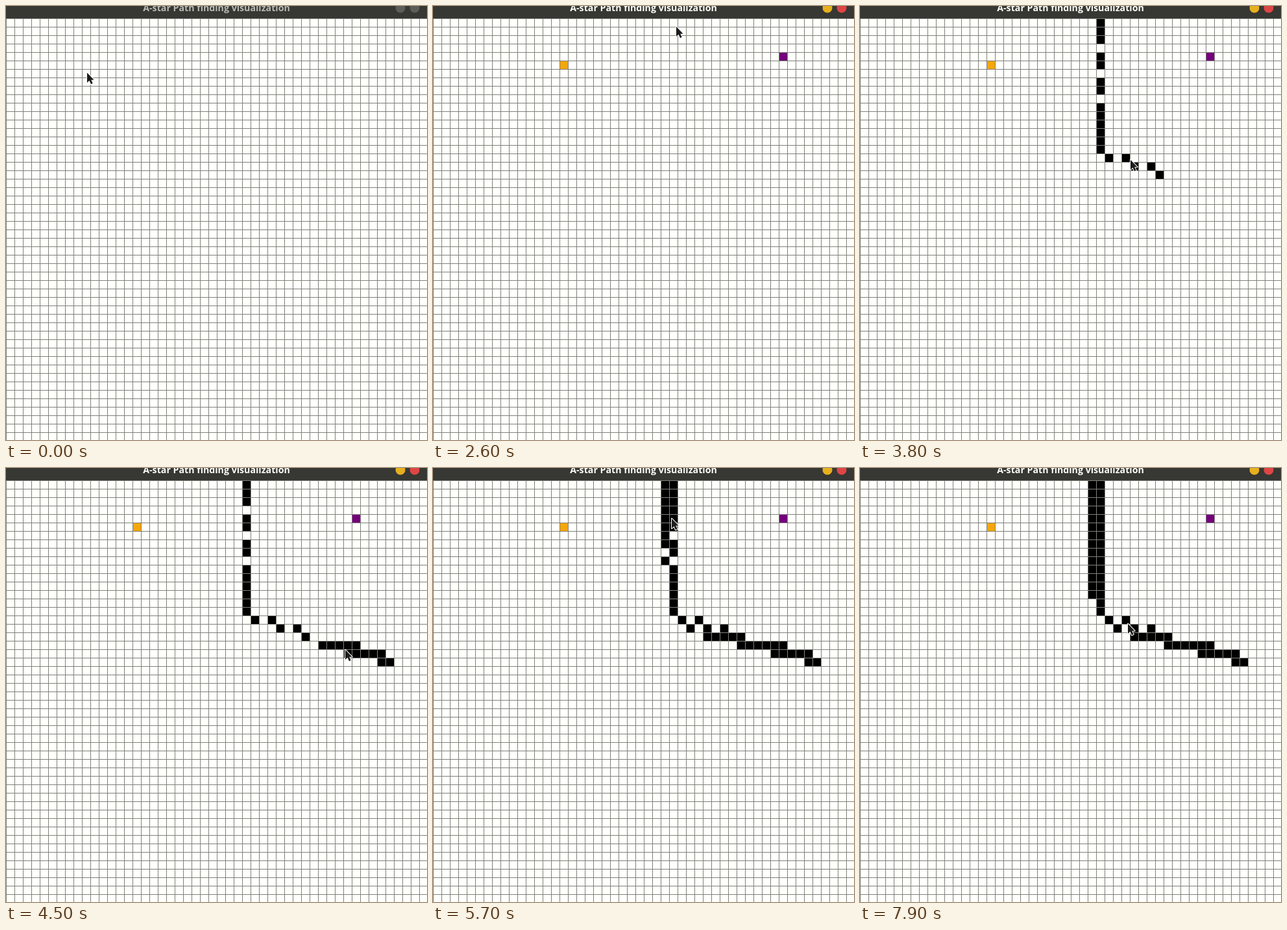
Recreate the animation shown at these times as an HTML page with a canvas. Size 649 by 668 pixels, loop 8000 ms.

```html
<!DOCTYPE html>
<html lang="en">
<head>
<meta charset="utf-8">
<title>A-star Path finding visualization</title>
<style>
html, body { margin: 0; width: 100%; height: 100%; overflow: hidden; }
canvas { display: block; }
</style>
</head>
<body>
<canvas id="stage" width="649" height="668"></canvas>
<script>
const W = 649, H = 668, CELL = 13, TOP = 19, LOOP = 8000, STEP = 100;
const ctx = document.getElementById('stage').getContext('2d');
const walls = [], moves = [];

// Paint cells evenly from time a to time b
function paint(a, b, cells) {
  const last = Math.max(1, cells.length - 1);
  cells.forEach(([col, row], i) => walls.push({ col, row, time: a + (b - a) * i / last }));
}
function range(a, b) {
  return Array.from({ length: Math.abs(b - a) + 1 }, (_, i) => a + i * Math.sign(b - a));
}
const column = (col, a, b) => range(a, b).map(row => [col, row]);
const line = (row, a, b) => range(a, b).map(col => [col, row]);
const gap = ([, row]) => row > 0 && row < 10 && row % 3 === 0;

// First pass: quick and full of holes
paint(2800, 3600, column(28, 0, 15).filter(c => !gap(c)));
paint(3700, 3800, range(0, 4).map(i => [Math.round(29 + 1.5 * i), 16 + (i >> 1)]));
paint(3900, 4000, line(19, 37, 41));
paint(4100, 4200, line(21, 44, 45));
// Way back: close the holes and thicken the wall
paint(4300, 4500, line(20, 44, 40));
paint(4600, 4800, [[36, 19], ...line(18, 36, 32), [30, 17]]);
paint(5100, 5500, column(27, 9, 0).filter(([, row]) => row !== 8));
paint(5700, 5900, column(28, 3, 9).filter(gap));
paint(6000, 6300, column(27, 8, 12));
paint(7300, 7300, column(27, 13, 13));

// Pointer rests between moves
function move(from, to, x, y) {
  moves.push({ from, to, x, y });
}
move(0, 0, 124, 101);
move(700, 900, 195, 90);
move(1500, 1600, 387, 61);
move(1700, 1800, 539, 72);
move(2200, 2600, 374, 30);
move(2700, 3600, 373, 225);
move(3600, 3800, 416, 235);
move(3800, 4200, 587, 293);
move(4200, 4500, 522, 278);
move(4500, 4900, 380, 225);
move(4900, 5400, 352, 37);
move(5400, 5700, 367, 76);
move(5700, 6300, 360, 179);
move(6300, 6600, 367, 105);
move(6600, 6800, 369, 74);
move(6900, 7300, 351, 194);
move(7700, 7900, 412, 238);

function pointerAt(t) {
  let { x, y } = moves[0];
  for (const m of moves) {
    if (t <= m.from) break;
    const p = Math.min(1, (t - m.from) / (m.to - m.from || 1));
    x += (m.x - x) * p;
    y += (m.y - y) * p;
  }
  return [Math.round(x), Math.round(y)];
}

function fillCell(col, row, color) {
  ctx.fillStyle = color;
  ctx.fillRect(col * CELL, TOP + row * CELL, CELL, CELL);
}

function dot(x, color) {
  ctx.fillStyle = color;
  ctx.beginPath();
  ctx.arc(x, 3, 7.5, 0, 7);
  ctx.fill();
}

function drawBar(active) {
  ctx.fillStyle = '#373733';
  ctx.fillRect(0, 0, W, TOP);
  ctx.font = 'bold 14.2px "Open Sans", sans-serif';
  ctx.textAlign = 'center';
  ctx.fillStyle = active ? '#fcfcf8' : '#b9b9b5';
  ctx.fillText('A-star Path finding visualization', 324.5, 8);
  dot(608, active ? '#e6b01e' : '#5c5c58');
  dot(630, active ? '#df4545' : '#5c5c58');
}

function drawGrid() {
  ctx.fillStyle = '#80807b';
  for (let x = 0; x < W; x += CELL) ctx.fillRect(x, TOP, 1, H);
  for (let y = TOP; y < H; y += CELL) ctx.fillRect(0, y, W, 1);
}

const arrow = new Path2D('M1 1.8V17L4.5 13.8 7 19.3 9.7 18.1 7.3 12.7H11.6Z');

function drawPointer([x, y]) {
  ctx.save();
  ctx.translate(x, y);
  ctx.lineWidth = 2;
  ctx.lineJoin = 'round';
  ctx.strokeStyle = '#fff';
  ctx.fillStyle = '#1c1c1c';
  ctx.stroke(arrow);
  ctx.fill(arrow);
  ctx.restore();
}

function draw(now) {
  const t = Math.floor(now % LOOP / STEP) * STEP;
  ctx.fillStyle = '#fffffc';
  ctx.fillRect(0, 0, W, H);
  if (t >= 1300) fillCell(15, 5, '#f4a60a');
  if (t >= 2000) fillCell(41, 4, '#74007a');
  for (const w of walls) if (t >= w.time) fillCell(w.col, w.row, '#000');
  drawGrid();
  drawBar(t >= 400);
  drawPointer(pointerAt(t));
}

const start = performance.now();
function tick() {
  draw(performance.now() - start);
  requestAnimationFrame(tick);
}
tick();
</script>
</body>
</html>
```
